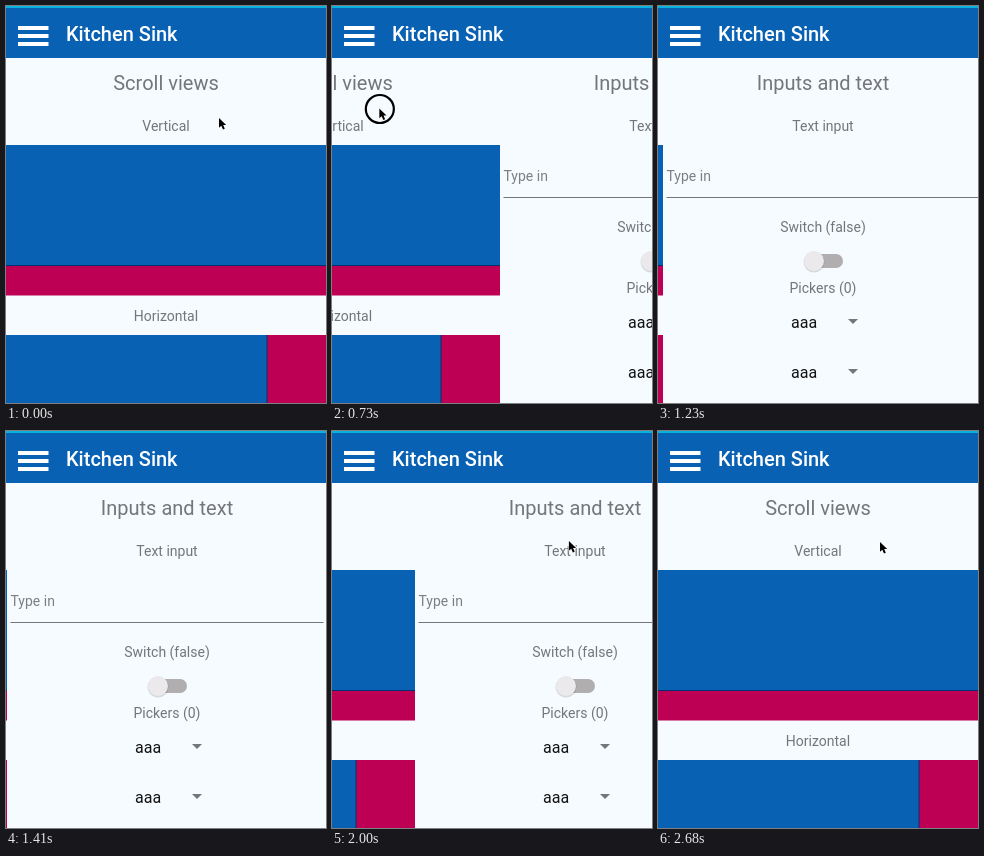
An HTML page for the animation above (2720 ms loop, 320x397 px).

```html
<!DOCTYPE html>
<html lang="en">
<head>
<meta charset="utf-8">
<title>Kitchen Sink</title>
<style>
  html, body { margin: 0; width: 100%; height: 100%; overflow: hidden; background: #f5fbff; }
  svg { display: block; width: 320px; height: 397px; font: 14px Roboto, sans-serif; }
  .label { fill: #747678; text-anchor: middle; }
  .title { font-size: 20px; }
  .value { font-size: 16px; fill: #111; }
  .blue { fill: #0961b3; }
  .red { fill: #be0055; }
  .edge { fill: #062f70; }
</style>
</head>
<body>
<svg viewBox="0 0 320 397">
  <defs>
    <g id="picker">
      <text class="value" x="128" y="5.5">aaa</text>
      <path d="M185-3h10l-5 5z" fill="#747678"/>
    </g>
  </defs>
  <rect width="320" height="397" fill="#f5fbff"/>

  <g id="pager">
    <g>
      <text class="label title" x="160" y="83.5">Scroll views</text>
      <text class="label" x="160" y="125">Vertical</text>
      <rect class="blue" y="139" width="320" height="121"/>
      <rect class="red" y="260" width="320" height="29.5"/>
      <rect class="edge" y="259" width="320" height="1"/>
      <text class="label" x="160" y="315">Horizontal</text>
      <rect class="blue" y="329" width="261" height="68"/>
      <rect class="red" x="261" y="329" width="59" height="68"/>
      <rect class="edge" x="260.5" y="329" width="1" height="68"/>
    </g>
    <g transform="translate(320)">
      <text class="label title" x="160" y="83.5">Inputs and text</text>
      <text class="label" x="160" y="125">Text input</text>
      <text x="3.5" y="174.5" fill="#7d7f81">Type in</text>
      <rect x="3.5" y="191" width="313" height="1" fill="#747678"/>
      <text class="label" x="160" y="225.5">Switch (false)</text>
      <rect x="144" y="248" width="36" height="14" rx="7" fill="#b1aeb0"/>
      <circle cx="151" cy="256" r="10.5" fill="#000" opacity=".13"/>
      <circle cx="151" cy="255" r="10" fill="#ebe9eb"/>
      <text class="label" x="160" y="286.5">Pickers (0)</text>
      <use href="#picker" y="316"/>
      <use href="#picker" y="366"/>
    </g>
  </g>

  <rect class="blue" width="320" height="52"/>
  <rect width="320" height="2" fill="#08b2dc"/>
  <path d="M12 22h30.500M12 30h30.500M12 38h30.500" stroke="#fff" stroke-width="4"/>
  <text x="60" y="35" fill="#fff" font-size="20" font-weight="500">Kitchen Sink</text>

  <g id="pointer">
    <circle id="touch" cx=".5" cy=".5" r="14" fill="none" stroke="#000" stroke-width="2.2"/>
    <path d="M0 0V9.800L2.300 7.800 4 11.500 5.800 10.700 4.200 7.100H7.200Z"
          fill="#000" stroke="#fff" stroke-width=".8" paint-order="stroke"/>
  </g>
</svg>
<script>
  const LOOP = 2720, STEP = LOOP / 60;
  const pager = document.getElementById('pager');
  const pointer = document.getElementById('pointer');
  const touch = document.getElementById('touch');

  // Keys are [time, ...values]
  const drag = [[580, 0], [725, 152], [952, 231]];
  const dragBack = [[1790, 320], [1900, 298], [1995, 237]];
  const path = [
    [0, 213, 112], [560, 213, 108], [725, 47.5, 102.5], [870, -25, 103],
    [1400, -25, 103], [1600, 41, 102.5], [1790, 41, 102.5],
    [1990, 237, 110], [2675, 222, 111]
  ];

  function tween(keys, t) {
    const i = keys.findIndex(k => k[0] > t);
    if (i === 0) return keys[0].slice(1);
    if (i < 0) return keys[keys.length - 1].slice(1);
    const a = keys[i - 1], b = keys[i];
    const p = (t - a[0]) / (b[0] - a[0]);
    return a.slice(1).map((v, n) => v + (b[n + 1] - v) * p);
  }

  // The page follows the finger, then settles exponentially
  function scrollAt(t) {
    if (t < 952) return tween(drag, t)[0];
    if (t < 1790) return 320 - 89 * Math.exp((952 - t) / 95);
    if (t < 1995) return tween(dragBack, t)[0];
    return 237 * Math.exp((1995 - t) / 88);
  }

  const move = (el, x, y) => el.setAttribute('transform', `translate(${x} ${y})`);

  const start = performance.now();
  function draw(now) {
    const time = Math.max(0, now - start) % LOOP;
    const t = Math.floor((time + 1) / STEP) % 60 * STEP;
    move(pager, -Math.round(scrollAt(t)), 0);
    move(pointer, ...tween(path, t));
    const down = (t > 530 && t < 870) || (t > 1700 && t < 1970);
    touch.setAttribute('visibility', down ? 'visible' : 'hidden');
    requestAnimationFrame(draw);
  }
  draw(start);
</script>
</body>
</html>
```
